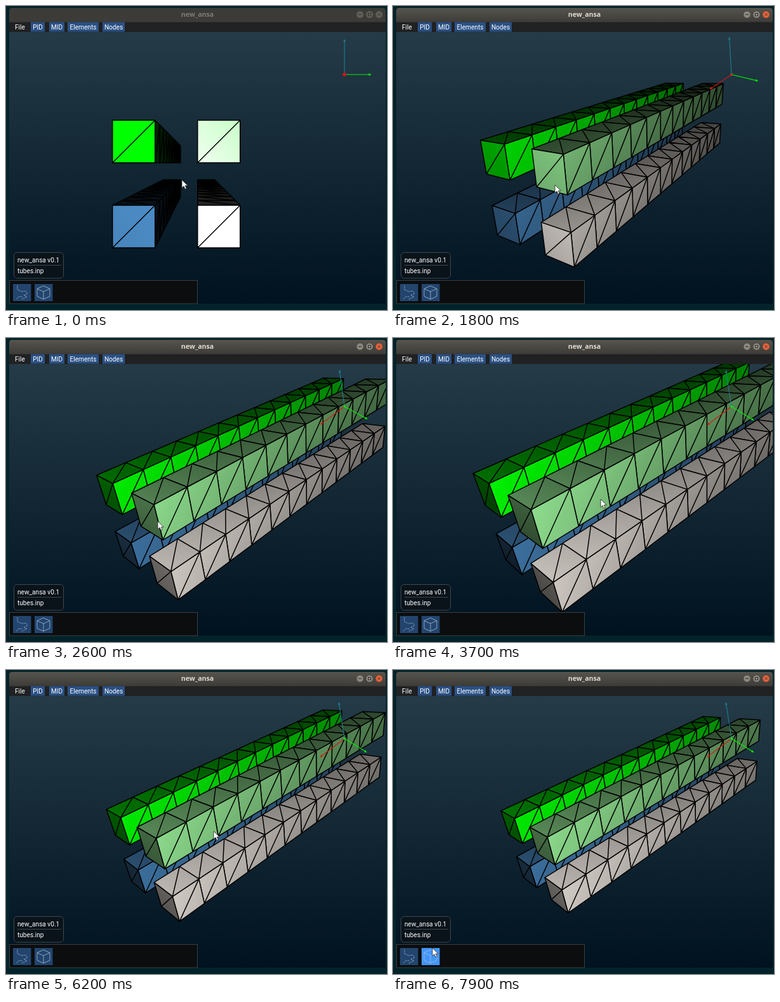
An HTML page with a canvas that plays this animation: 600 by 479 pixels, repeating every 8 s.

```html
<!DOCTYPE html>
<html lang="en">
<head>
<meta charset="utf-8">
<title>new_ansa</title>
<style>
html, body { margin: 0; width: 600px; height: 479px; overflow: hidden; background: #03232a; }
canvas, svg { position: absolute; left: 0; top: 0; display: block; }
text { font: 10.1px Roboto, sans-serif; fill: #fff; }
.title { font: bold 10.6px "Open Sans", sans-serif; text-anchor: middle; }
</style>
</head>
<body>
<canvas id="scene" width="600" height="479"></canvas>
<svg id="ui" width="600" height="479" viewBox="0 0 600 479">
  <defs>
    <linearGradient id="bar" x1="0" y1="0" x2="0" y2="1">
      <stop offset="0" stop-color="#56544d"/><stop offset="1" stop-color="#3d3b37"/>
    </linearGradient>
    <path id="frame" d="M5 26V8q0-5 5-5H593q5 0 5 5V26z"/>
  </defs>
  <use href="#frame" fill="#3c3b37"/>
  <g fill="#605e57" stroke="#45433e">
    <circle cx="557.5" cy="13.5" r="5.7"/><circle cx="572.5" cy="13.5" r="5.7"/><circle cx="587.5" cy="13.5" r="5.7"/>
  </g>
  <text class="title" x="301.5" y="17" style="fill:#807d78">new_ansa</text>
  <g id="active">
    <use href="#frame" fill="url(#bar)"/>
    <g fill="#8b8880" stroke="#45433e">
      <circle cx="557.5" cy="13.5" r="5.7"/><circle cx="572.5" cy="13.5" r="5.7"/>
      <circle cx="587.5" cy="13.5" r="5.7" fill="#e9623b"/>
    </g>
    <text class="title" x="301.5" y="17" style="fill:#dfdbd2">new_ansa</text>
  </g>
  <path d="M555 13.5h5M570.5 11.5h4v4h-4zM585.5 11.5l4 4m0-4l-4 4" fill="none" stroke="#33312d"/>
  <rect x="5" y="25.5" width="593" height="15.5" fill="#202122"/>
  <text x="14" y="36.5">File</text>
  <g id="menu"></g>

  <rect x="12.5" y="388.5" width="78" height="40.5" rx="5" fill="#0a131a" stroke="#40474d"/>
  <path d="M18 408.5H87" stroke="#40474d"/>
  <text x="18" y="403.5">new_ansa v0.1</text>
  <text x="18" y="421">tubes.inp</text>

  <rect x="5.5" y="432.5" width="296" height="36.5" fill="#0b0d0f" stroke="#3b3f43"/>
  <rect x="11" y="438" width="28.5" height="27" fill="#22456f"/>
  <rect id="cube" x="45" y="438" width="28.5" height="27"/>
  <g fill="none" stroke="#aebccd" stroke-width=".8">
    <path d="M17 441h3M18 443v4l7 3 6-1 3 4-6 3 5 2-8 4M16 462l4-4h6" stroke-dasharray="2 1"/>
    <path d="M59 441l10 4.5v12L59 462l-10-4.5v-12zM49 445.5l10 4.5 10-4.5M59 450v12"/>
  </g>
  <path id="cursor" d="M0 0V12.5L3 9.8 5 14.5 7.2 13.5 5.2 9H9.3z" fill="#fff" stroke="#222" stroke-width=".8"/>
</svg>
<script>
const $ = id => document.getElementById(id);
const g = $('scene').getContext('2d');

$('menu').innerHTML = [['PID', 39, 22], ['MID', 68, 24], ['Elements', 97, 49], ['Nodes', 152, 35]]
  .map(([s, x, w]) => `<rect x="${x}" y="25.5" width="${w}" height="15" fill="#2a5185"/>` +
    `<text x="${x + w / 2}" y="36.5" text-anchor="middle">${s}</text>`).join('');

const LENGTH = 12, FOCAL = 536, CX = 301.7, CY = 247, RAD = Math.PI / 180;

// mouse drag: time, yaw, pitch (degrees), pointer x, y
const DRAG = [
  [900, 0, 0, 277, 274],
  [1400, 1.3, 4.7, 276, 276],
  [1800, 39, 17.7, 255, 282],
  [2100, 41.6, 18.8, 254, 283],
  [2700, 57.6, 25.7, 236, 290]
];
// later pointer moves: start, end, x, y
const MOVES = [[2800, 3200, 327, 254], [7200, 7400, 85, 444], [7400, 7500, 69, 418], [7600, 7800, 62, 438]];

// blue, white, green, pale green: lower pair first, left before right
const TUBES = [
  { color: [68, 126, 178], gloss: 0 },
  { color: [236, 228, 220], gloss: 1 },
  { color: [0, 245, 0], gloss: 0 },
  { color: [128, 216, 128], gloss: 1 }
].map((t, i) => ({ ...t, y: i % 2 * 2, z: i >> 1 << 1 }));

const clamp = (v, lo, hi) => Math.min(hi, Math.max(lo, v));
const dot = (a, b) => a[0] * b[0] + a[1] * b[1] + a[2] * b[2];
const mul = (a, k) => a.map(v => v * k);
const mix = (a, b, k) => a.map((v, i) => v + (b[i] - v) * k);
const cross = (a, b) => [a[1] * b[2] - a[2] * b[1], a[2] * b[0] - a[0] * b[2], a[0] * b[1] - a[1] * b[0]];

function dragAt(t) {
  const i = Math.max(1, DRAG.findIndex(k => k[0] > t));
  if (t >= 2700) return DRAG[DRAG.length - 1].slice(1);
  const [a, b] = [DRAG[i - 1], DRAG[i]];
  return mix(a, b, clamp((t - a[0]) / (b[0] - a[0]), 0, 1)).slice(1);
}

const pointer = (t, start) =>
  MOVES.reduce((p, [from, to, x, y]) => mix(p, [x, y], clamp((t - from) / (to - from), 0, 1)), start);

// wheel clicks made by time t, one per 100 ms
const clicks = (t, start, n) => clamp(Math.floor((t - start) / 100) + 1, 0, n);
const distance = t => 10 - clicks(t, 3700, 2) + clicks(t, 4800, 1) + clicks(t, 5100, 1) +
  clicks(t, 6200, 4) - clicks(t, 6900, 2);

// tube axes in view space; the trackball twists as it turns
function basis(yaw, pitch) {
  const a = yaw * RAD, b = pitch * RAD, twist = .72 * a * b;
  const ex = [Math.sin(a) * Math.cos(b), -Math.sin(b), Math.cos(a) * Math.cos(b)];
  const down = [Math.sin(a) * Math.sin(b), Math.cos(b), Math.cos(a) * Math.sin(b)];
  const side = [Math.cos(a), 0, -Math.sin(a)];
  const ed = down.map((v, i) => v * Math.cos(twist) - side[i] * Math.sin(twist));
  return { ex, ed, ey: cross(ed, ex) };
}

// lamp at the eye
function shade(p, n, { color, gloss }) {
  const nv = Math.max(0, -dot(n, p) / Math.hypot(...p));
  const shine = gloss * (33 * nv + 64 * Math.max(0, 2 * nv * nv - 1) ** 14);
  return { nv, css: `rgb(${color.map(c => Math.min(255, Math.round(c * nv * 1.12 + shine)))})` };
}

function quad(pts, n, look) {
  if (dot(n, pts[0]) > -1e-3) return;
  const s = pts.map(p => [CX + FOCAL * p[0] / p[2], CY + FOCAL * p[1] / p[2]]);
  const lit = pts.map((p, i) => ({ ...shade(p, n, look), at: s[i] })).sort((a, b) => a.nv - b.nv);
  const fill = g.createLinearGradient(...lit[0].at, ...lit[3].at);
  fill.addColorStop(0, lit[0].css);
  fill.addColorStop(1, lit[3].css);
  g.beginPath();
  s.forEach(p => g.lineTo(...p));
  g.closePath();
  g.fillStyle = fill;
  g.fill();
  g.moveTo(...s[0]);
  g.lineTo(...s[2]);
  g.stroke();
}

function tube(look, { ex, ey, ed }, dist) {
  const at = (i, j, k) => ex.map((v, m) =>
    v * (i - 2) + ey[m] * (look.y + j - 2) - ed[m] * (look.z + k - 2) + (m === 2 ? dist : 0));
  const up = mul(ed, -1);
  for (let i = LENGTH - 1; i >= 0; i--) {
    quad([at(i, 1, 0), at(i + 1, 1, 0), at(i + 1, 1, 1), at(i, 1, 1)], ey, look);
    quad([at(i, 1, 1), at(i + 1, 1, 1), at(i + 1, 0, 1), at(i, 0, 1)], up, look);
  }
  quad([at(0, 0, 0), at(0, 1, 0), at(0, 1, 1), at(0, 0, 1)], mul(ex, -1), look);
}

function axis([v, color]) {
  const k = 1 / (1 + .345 * v[2]), x = 533 + 40 * v[0] * k, y = 108 + 53.5 * v[1] * k;
  const a = Math.atan2(y - 108, x - 533);
  g.strokeStyle = g.fillStyle = color;
  g.lineWidth = 1.1;
  g.beginPath();
  g.moveTo(533, 108);
  g.lineTo(x, y);
  g.stroke();
  g.fillRect(531.5, 106.5, 3, 3);
  g.beginPath();
  for (const turn of [0, 2.3, -2.3]) g.lineTo(x + 2.6 * Math.cos(a + turn), y + 2.6 * Math.sin(a + turn));
  g.fill();
  if (v[2] < -.9) {
    g.beginPath();
    g.arc(x, y, 2.8, 0, 7);
    g.fill();
  }
}

function drawScene(view, dist) {
  g.save();
  g.clearRect(0, 0, 600, 479);
  g.beginPath();
  g.rect(5, 41, 593, 428);
  g.clip();
  const sky = g.createLinearGradient(0, 41, 0, 469);
  sky.addColorStop(0, '#253b48');
  sky.addColorStop(1, '#00121f');
  g.fillStyle = sky;
  g.fillRect(5, 41, 593, 428);

  g.strokeStyle = '#000';
  g.lineWidth = 1.5;
  g.lineJoin = 'round';
  for (const look of TUBES) tube(look, view, dist);

  // nearest tip last
  [[mul(view.ed, -1), '#1f7f92'], [view.ey, '#00f000'], [mul(view.ex, -1), '#e01010']]
    .sort((a, b) => b[0][2] - a[0][2]).forEach(axis);
  g.restore();
}

function draw(t) {
  const [yaw, pitch, x, y] = dragAt(t);
  drawScene(basis(yaw, pitch), distance(t));
  $('active').setAttribute('opacity', clamp((t - 400) / 200, 0, 1));
  $('cube').setAttribute('fill', t >= 7700 ? '#4296fa' : '#22456f');
  $('cursor').setAttribute('transform', `translate(${pointer(t, [x, y])})`);
}

let last = -1;
function tick(now) {
  const t = Math.floor(now % 8000 / 100) * 100;
  if (t !== last) draw(last = t);
  requestAnimationFrame(tick);
}
draw(0);
requestAnimationFrame(tick);
</script>
</body>
</html>
```
